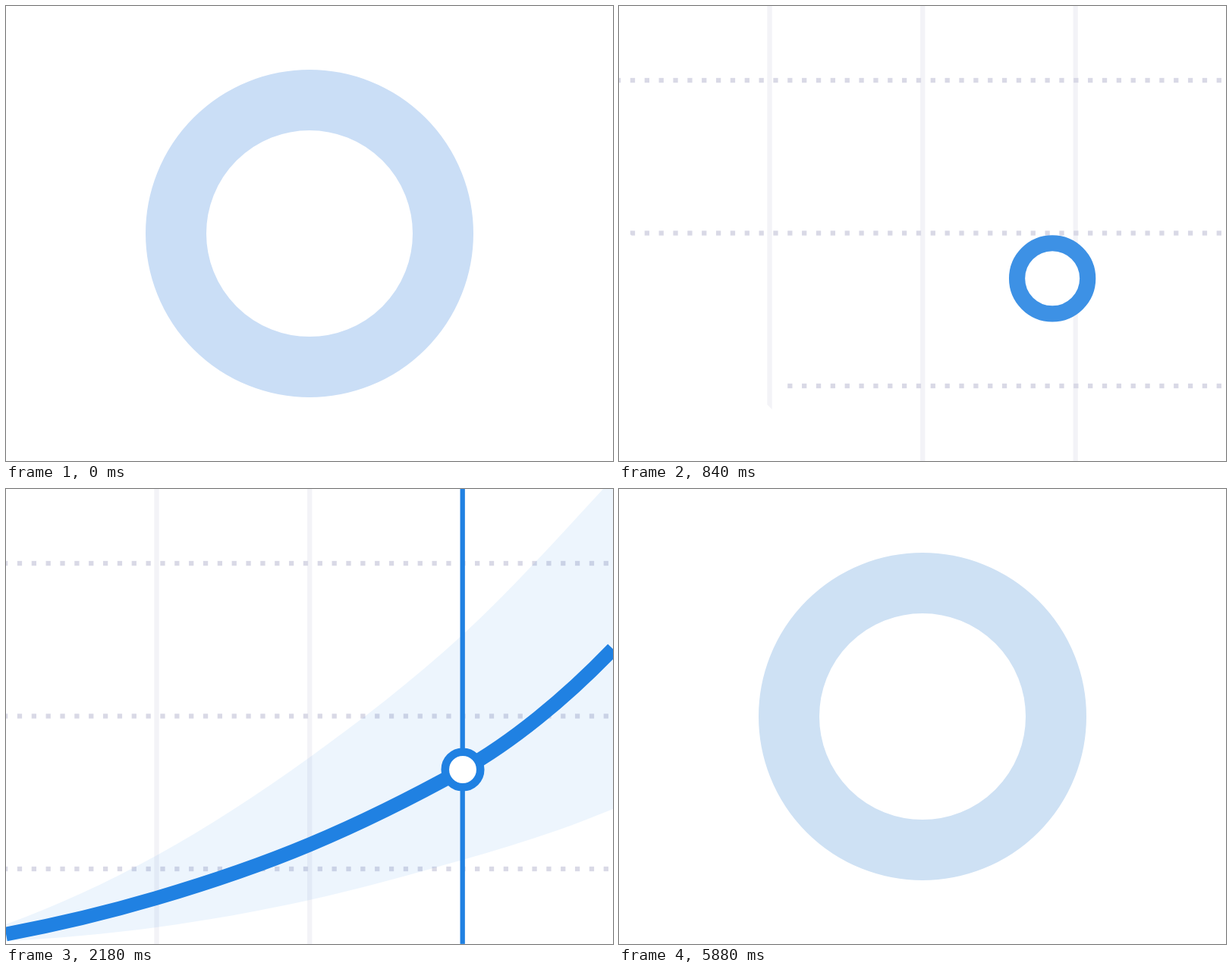
Recreate the animation shown at these times as an HTML page with a canvas. Size 800 by 600 pixels, loop 6.94 s.

```html
<!DOCTYPE html>
<html lang="en">
<head>
<meta charset="utf-8">
<title>Forecast chart</title>
<style>
  html, body { margin: 0; width: 100%; height: 100%; overflow: hidden; background: #fff; }
  canvas { display: block; }
</style>
</head>
<body>
<canvas id="stage" width="800" height="600"></canvas>
<script>
const ctx = document.getElementById('stage').getContext('2d');
const LOOP = 6940, W = 800, H = 600, UNIT = 6.283;
const BLUE = [32, 129, 226], PALE = [202, 222, 246], REST = [206, 225, 244], WHITE = [255, 255, 255];

// The first and last point of each list only set the slope of the ends.
const trend = [[-198, 614], [0, 587], [198, 539.5], [400, 469], [602, 370], [701, 302], [800, 211], [900, 95]];
const upper = [[-198, 629], [0, 574], [198, 483.5], [400, 354], [602, 192], [787, 0], [900, -130], [1000, -250]];
const lower = [[-198, 598], [0, 596], [198, 578], [400, 542], [602, 489], [727, 450], [800, 422], [900, 381], [1000, 340]];

const clamp = v => Math.min(1, Math.max(0, v));
const mix = (a, b, k) => a + (b - a) * k;
const blend = (a, b, k) => `rgb(${a.map((v, i) => mix(v, b[i], k))})`;

// cubic-bezier(.25, .1, .25, 1)
function ease(x) {
  let lo = 0, hi = 1;
  for (let i = 0; i < 24; i++) {
    const s = (lo + hi) / 2;
    if (.75 * s * (1 - s) + s ** 3 < x) lo = s; else hi = s;
  }
  return .3 * lo * (1 - lo) ** 2 + 3 * (1 - lo) * lo ** 2 + lo ** 3;
}

const during = (t, start, length) => {
  const u = clamp((t - start) / length);
  return u === 0 || u === 1 ? u : ease(u);
};

function curve(points) {
  const slope = i => (points[i + 1][1] - points[i - 1][1]) / (points[i + 1][0] - points[i - 1][0]);
  ctx.lineTo(...points[1]);
  for (let i = 1; i < points.length - 2; i++) {
    const [x0, y0] = points[i], [x1, y1] = points[i + 1], d = (x1 - x0) / 3;
    ctx.bezierCurveTo(x0 + d, y0 + d * slope(i), x1 - d, y1 - d * slope(i + 1), x1, y1);
  }
}

function clipped(outline, draw) {
  ctx.save();
  ctx.beginPath();
  outline();
  ctx.clip();
  ctx.beginPath();
  draw();
  ctx.restore();
}

const wipeRight = (p, draw) => clipped(() => ctx.rect(0, 0, W * p, H), draw);

// Uncovers the stage from the top right corner along a 45 degree edge.
const wipeCorner = (p, draw) => clipped(() => {
  const c = mix(-W, H, p);
  ctx.moveTo(W, -W);
  ctx.lineTo(-W, -W);
  ctx.lineTo(-W, c - W);
  ctx.lineTo(W, c + W);
}, draw);

function ring(x, y, scale, color) {
  ctx.beginPath();
  ctx.arc(x, y, 176 * scale, 0, 2 * Math.PI);
  ctx.fillStyle = '#fff';
  ctx.fill();
  ctx.lineWidth = 80 * scale;
  ctx.strokeStyle = color;
  ctx.stroke();
}

function columns() {
  ctx.fillStyle = '#f3f3f7';
  for (const x of [198.5, 400.2, 601.7]) ctx.fillRect(x - UNIT / 2, 0, UNIT, H);
}

function dots() {
  ctx.fillStyle = '#d9d9e6';
  for (const y of [98, 299.5, 501])
    for (let x = -.85; x < W; x += 3 * UNIT)
      ctx.fillRect(x - UNIT / 2, y - UNIT / 2, UNIT, UNIT);
}

function band() {
  curve(upper);
  ctx.lineTo(1000, 340);
  ctx.lineTo(1000, 600);
  ctx.lineTo(0, 600);
  ctx.closePath();
  ctx.clip();
  ctx.beginPath();
  ctx.moveTo(0, -300);
  curve(lower);
  ctx.lineTo(1000, -300);
  ctx.fillStyle = 'rgba(32, 129, 226, .08)';
  ctx.fill();
}

function trendLine() {
  curve(trend);
  ctx.lineWidth = 3 * UNIT;
  ctx.strokeStyle = blend(BLUE, BLUE, 0);
  ctx.stroke();
}

function chart(t) {
  wipeCorner(during(t, 335, 1000), columns);
  wipeCorner(during(t, 560, 590), dots);
  wipeRight(during(t, 858, 1008), band);
  wipeRight(during(t, 1097, 880), trendLine);
  ctx.fillStyle = blend(BLUE, BLUE, 0);
  ctx.fillRect(601.7 - UNIT / 2, 0, UNIT, H * during(t, 1307, 890));

  const p = during(t, 222, 1125);
  ring(mix(400, 602, p), mix(300, 370, p), mix(1, .132, p), blend(PALE, BLUE, p ** 1.13));

  if (t >= 5320) {
    ctx.fillStyle = `rgba(255, 255, 255, ${during(t, 5294, 200)})`;
    ctx.fillRect(0, 0, W, H);
  }
}

function frame(now) {
  const t = Math.floor(now % LOOP / 20) * 20;
  ctx.fillStyle = '#fff';
  ctx.fillRect(0, 0, W, H);
  if (t < 5500) chart(t);
  else if (t >= 5620) ring(400, 300, 1, blend(WHITE, REST, t < 5680 ? .5 : t < 5880 ? .93 : 1));
}

const start = performance.now();
function tick() {
  frame(performance.now() - start);
  requestAnimationFrame(tick);
}
tick();
</script>
</body>
</html>
```
